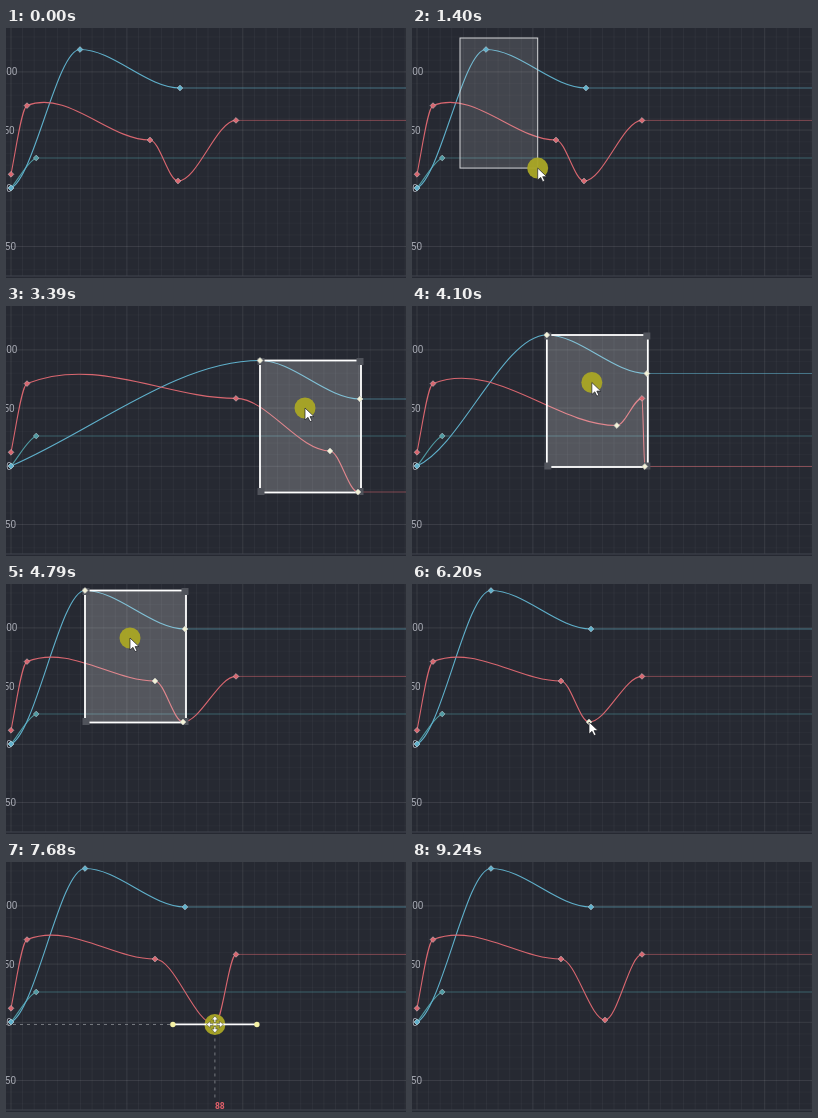
Recreate the animation shown at these times as an HTML page. Size 400 by 250 pixels, loop 9700 ms.

```html
<!DOCTYPE html>
<html lang="en">
<head>
<meta charset="utf-8">
<title>Curve editor</title>
<style>
html, body { margin: 0; width: 100%; height: 100%; overflow: hidden; background: #262932; }
svg { display: block; width: 400px; height: 250px; }
text { font-family: Roboto, Arial, sans-serif; }
path, line { fill: none; }
</style>
</head>
<body>
<svg id="stage" viewBox="0 0 400 250"></svg>
<script>
const LOOP = 9700;
const FRAME = 2.318;   // pixels per frame on the time axis
const ORIGIN = { x: 5, y: 160.3 };
const BLUE = '#5fb0cb', RED = '#d9666f';
const stage = document.getElementById('stage');

function set(el, attrs) {
  for (const k in attrs) el.setAttribute(k, attrs[k]);
  return el;
}
function add(tag, attrs, parent = stage) {
  return parent.appendChild(set(document.createElementNS('http://www.w3.org/2000/svg', tag), attrs));
}
function show(el, on) { el.style.display = on ? '' : 'none'; }

// Pointer path: time, x, y
const pointer = [
  [150, 197, 189], [690, 48, 12], [860, 48, 10], [1010, 48, 10],
  [1570, 168, 188], [1720, 195, 198], [1810, 196, 198], [2060, 196, 198],
  [2510, 119, 69], [2680, 119, 69], [3390, 299, 102], [3480, 299, 102],
  [4100, 180, 76.5], [4240, 159, 79], [4790, 124, 54], [5260, 124, 54],
  [5570, 167, 168], [5660, 167, 168], [5890, 173, 132], [6050, 173, 132],
  [6200, 177, 138], [6480, 177, 138], [7220, 270, 176], [7310, 270, 176],
  [7680, 209, 162.5], [7830, 199, 159], [8150, 193, 158], [8310, 193, 158],
  [8700, 248, 193], [8870, 248, 193], [9240, 322, 256]
];

// Monotone cubic interpolation along one axis
function along(t, axis) {
  const p = pointer, last = p.length - 1;
  if (t <= p[0][0]) return p[0][axis];
  if (t >= p[last][0]) return p[last][axis];
  const i = p.findIndex(k => k[0] > t) - 1;
  const slope = j => j < 0 || j >= last ? 0 : (p[j + 1][axis] - p[j][axis]) / (p[j + 1][0] - p[j][0]);
  const tangent = j => {
    const a = slope(j - 1), b = slope(j);
    return a * b <= 0 ? 0 : 2 * a * b / (a + b);
  };
  const h = p[i + 1][0] - p[i][0], u = (t - p[i][0]) / h, v = 1 - u;
  return p[i][axis] * v * v * (1 + 2 * u) + p[i + 1][axis] * u * u * (3 - 2 * u)
    + h * u * v * (tangent(i) * v - tangent(i + 1) * u);
}
function pointAt(t) { return { x: along(t, 1), y: along(t, 2) }; }

// Background grid
for (let k = 0; k < 36; k++) {
  const x = ORIGIN.x + k * 5 * FRAME;
  add('line', { x1: x, x2: x, y1: 0, y2: 248, stroke: '#fff', 'stroke-opacity': k % 10 ? .045 : .09 });
}
for (let k = -7; k < 14; k++) {
  const y = ORIGIN.y - k * 11.64;
  add('line', { x1: 0, x2: 400, y1: y, y2: y, stroke: '#fff', 'stroke-opacity': k % 5 ? .025 : .09 });
}
add('line', { x1: 0, x2: 400, y1: 248, y2: 248, stroke: '#41444e' });
for (const v of [100, 50, 0, -50]) {
  add('text', { x: 3, y: ORIGIN.y - v * 1.164 + 3.5, 'font-size': 10, 'text-anchor': 'middle', fill: '#a6a9b2' })
    .textContent = v;
}

// Each key: x, y, upward slope, member of the moved group
const key = (x, y, slope = 0, group = false) => ({ x, y, slope, group });
const curves = [
  { color: '#4f9aa2', dim: .5, keys: [key(5, 160, 1.2), key(30.2, 130, .4)] },
  { color: BLUE, dim: .55, keys: [key(5, 160, .43), key(74, 21.5, 0, true), key(174, 60, 0, true)] },
  { color: RED, dim: .5, keys: [key(5, 146.3, 5), key(21, 77.6, .4), key(144, 112, 0, true), key(172, 153, 0, true), key(230, 92.4)] }
];
const dragged = curves[2].keys[3];

for (const c of curves) {
  c.tail = add('line', { stroke: c.color, 'stroke-opacity': c.dim });
  c.path = add('path', { stroke: c.color, 'stroke-width': 1.1 });
}

const marquee = add('rect', { x: 48, y: 10, fill: '#fff', 'fill-opacity': .13, stroke: '#d4d5d8' });

const box = add('g', {});
add('rect', { x: 74, y: 21.5, width: 101, height: 132, fill: '#fff', 'fill-opacity': .21, stroke: '#fff', 'stroke-width': 1.8 }, box);
for (const x of [75, 174]) for (const y of [22.5, 152.5]) {
  add('rect', { x: x - 3.5, y: y - 3.5, width: 7, height: 7, fill: '#50535b' }, box);
}

const guides = add('path', { stroke: '#777a80', 'stroke-dasharray': '3 4' });
const frameLabel = add('text', { y: 247, 'font-size': 8.5, 'font-weight': 700, fill: '#e2606b' });

const diamond = 'M0 -2.9L2.9 0L0 2.9L-2.9 0Z';
for (const c of curves) for (const k of c.keys) {
  k.mark = add('path', { d: diamond });
  k.color = c.color;
}

const spot = add('circle', { r: 10.5, fill: '#a9a625', 'fill-opacity': .96 });
const handles = add('g', {});
add('line', { x1: -42, x2: 42, stroke: '#fff', 'stroke-width': 1.8 }, handles);
for (const x of [-42, 42]) add('circle', { cx: x, r: 2.7, fill: '#f5f1a4' }, handles);

const arrow = add('path', { d: 'M0 0V12L3 9.3L5 13.6L7 12.7L5 8.6H9Z', stroke: '#1d1f25', 'stroke-width': .7 });
arrow.style.fill = '#fff';
const mover = add('g', {});
for (const a of [0, 90, 180, 270]) {
  const tip = add('path', { d: 'M0 -8.5L3.2 -4.6H.9V-2H-.9V-4.6H-3.2Z', transform: `rotate(${a})`, stroke: '#33351c', 'stroke-width': .5 }, mover);
  tip.style.fill = '#fff';
}

function curvePath(keys) {
  let d = `M${keys[0].px} ${keys[0].py}`;
  for (let i = 1; i < keys.length; i++) {
    const a = keys[i - 1], b = keys[i], h = (b.px - a.px) / 3;
    d += `C${a.px + h} ${a.py - a.slope * h} ${b.px - h} ${b.py + b.slope * h} ${b.px} ${b.py}`;
  }
  return d;
}

function draw(t) {
  const inside = (a, b) => t >= a && t < b;
  const p = pointAt(t);
  const grab = pointAt(Math.min(Math.max(t, 2680), 4790));
  const dx = grab.x - 119, dy = grab.y - 69;
  const boxed = inside(2120, 5100), editing = inside(6430, 8380);

  for (const c of curves) {
    for (const k of c.keys) {
      k.px = k.x + (k.group ? dx : 0);
      k.py = k.y + (k.group ? dy : 0);
      if (k === dragged && t > 6430) {
        const q = pointAt(Math.min(t, 8310));
        k.px = q.x;
        k.py = q.y;
      }
      const picked = k.group && boxed || k === dragged && inside(6200, 8380);
      set(k.mark, {
        transform: `translate(${k.px} ${k.py})`,
        style: `fill:${picked ? '#f3f2d8' : k.color}`,
        stroke: picked ? '#c9cbc4' : '#d5d9de',
        'stroke-width': .7,
        'stroke-opacity': picked ? 1 : .65
      });
    }
    const sorted = [...c.keys].sort((a, b) => a.px - b.px);
    const end = sorted[sorted.length - 1];
    set(c.path, { d: curvePath(sorted) });
    set(c.tail, { x1: end.px, x2: 400, y1: end.py, y2: end.py });
  }

  show(marquee, inside(1010, 2120));
  set(marquee, { width: Math.max(0, p.x - 48), height: Math.max(0, p.y - 10) });
  show(box, boxed);
  set(box, { transform: `translate(${dx} ${dy})` });

  const { px, py } = dragged;
  for (const el of [guides, handles, frameLabel]) show(el, editing);
  set(guides, { d: `M0 ${py}H${px}M${px} ${py}V238` });
  set(handles, { transform: `translate(${px} ${py})` });
  set(frameLabel, { x: px });
  frameLabel.textContent = Math.round((px - ORIGIN.x) / FRAME);

  show(spot, inside(1010, 2120) || inside(2680, 5100) || editing);
  set(spot, { cx: p.x, cy: p.y });
  show(arrow, inside(150, 6430));
  show(mover, inside(6430, 9240));
  const place = { transform: `translate(${p.x} ${p.y})` };
  set(arrow, place);
  set(mover, place);
}

function tick() {
  draw(performance.now() % LOOP);
  requestAnimationFrame(tick);
}
tick();
</script>
</body>
</html>
```
